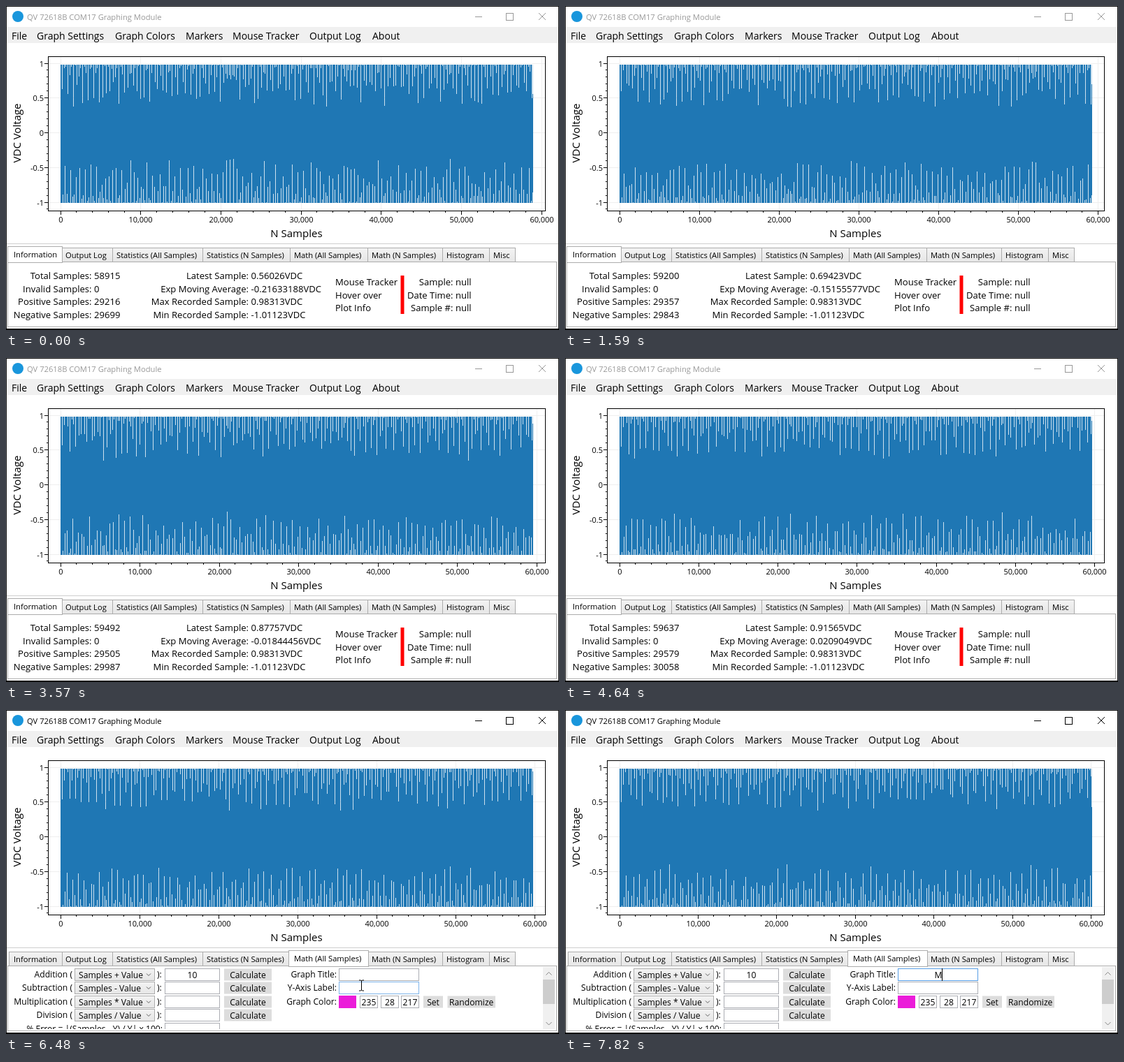
Write an HTML page that moves like this. It is 791 px wide and 464 px high and loops after 8000 ms.

```html
<!DOCTYPE html>
<html lang="en">
<head>
<meta charset="utf-8">
<title>Graphing Module</title>
<style>
  html, body { margin: 0; width: 100%; height: 100%; overflow: hidden; background: #fff; }
  svg { display: block; width: 791px; height: 464px; }
  text { font-family: "Open Sans", "Noto Sans", sans-serif; fill: #000; white-space: pre; }
  .crisp { shape-rendering: crispEdges; }
  .hidden { visibility: hidden; }
  .tab rect { fill: url(#face); stroke: #acacac; }
  .tab.hover rect { fill: url(#hot); stroke: #7eb4ea; }
  .tab.active rect { fill: #fff; }
  #title { fill: #999; }
  #buttons { stroke: #999; fill: none; }
  .focused #title { fill: #000; }
  .focused #buttons { stroke: #000; }
</style>
</head>
<body>
<svg id="stage" viewBox="0 0 791 464" xmlns="http://www.w3.org/2000/svg"></svg>
<script>
const LOOP = 8000;
const PLOT = { left: 60.5, top: 72.5, right: 771.5, bottom: 293.5, x0: 78, x1: 753.6, y0: 181.5, unit: 99.5 };
const PERIOD = 140.9, AMP = 0.997, BIAS = -0.014;

// time, samples, positive samples, latest value, moving average
const UPDATES = [
  [0, 58915, 29216, 0.56026, '-0.21633188'],
  [530, 59058, 29287, 0.63172, '-0.18402516'],
  [1590, 59200, 29357, 0.69423, '-0.15155577'],
  [2580, 59346, 29431, 0.79318, '-0.08614203'],
  [3570, 59492, 29505, 0.87757, '-0.01844456'],
  [4640, 59637, 29579, 0.91565, '0.0209049'],
  [5670, 59775, 29649, 0.94007, '0.03826596'],
  [6690, 59920, 29722, 0.71346, '0.04211835'],
  [7750, 60068, 29796, 0.43127, '0.04570912']
];
const TABS = [
  ['Information', 4, 80, 11], ['Output Log', 80, 152, 85],
  ['Statistics (All Samples)', 152, 281, 158], ['Statistics (N Samples)', 281, 406, 287],
  ['Math (All Samples)', 406, 517, 412], ['Math (N Samples)', 517, 624, 523],
  ['Histogram', 624, 691, 630], ['Misc', 691, 728, 697]
];
// time, x, y of the pointer
const POINTER = [
  [5040, 474, 441], [5320, 470, 398], [5530, 464, 368], [5670, 462, 360], [6130, 462, 360],
  [6340, 497, 384], [6480, 508, 394], [6550, 509, 390], [6620, 511, 385], [6760, 512, 380], [8000, 512, 380]
];
const CLICK_TAB = 6000, CLICK_BOX = 6760, TYPE = 7820, BLINK = 530;

const text = (x, y, s, size, anchor = 'start', more = '') =>
  `<text x="${x}" y="${y}" font-size="${size}" text-anchor="${anchor}" ${more}>${s}</text>`;
const rect = (x, y, w, h, fill, stroke = 'none', more = '') =>
  `<rect x="${x}" y="${y}" width="${w}" height="${h}" fill="${fill}" stroke="${stroke}" ${more}/>`;
const path = (d, stroke, more = '') => `<path d="${d}" stroke="${stroke}" fill="none" ${more}/>`;
const $ = id => document.getElementById(id);
const toY = v => PLOT.y0 - v * PLOT.unit;

function frameMarkup() {
  const menu = [['File', 8], ['Graph Settings', 44], ['Graph Colors', 156], ['Markers', 257],
    ['Mouse Tracker', 324], ['Output Log', 434], ['About', 524]];
  return rect(0, 0, 791, 464, '#fff') + rect(1, 30, 789, 23, '#f0f0f0') +
    '<circle cx="17" cy="15" r="8" fill="#1996dc"/>' +
    text(30, 20, 'QV 72618B COM17 Graphing Module', 11.2, 'start', 'id="title"') +
    `<g id="buttons"><path class="crisp" d="M671 15.5h10M715.5 10.5h10v10h-10z"/><path d="M762 10l10 10M772 10l-10 10"/></g>` +
    menu.map(([s, x]) => text(x, 48, s, 14, 'start', 'fill="#212121"')).join('');
}

function plotMarkup() {
  let grid = '', ticks = '', labels = '';
  for (let i = -11; i <= 10; i++) {
    const y = Math.floor(toY(i / 10)) + 0.5, major = i % 5 === 0;
    ticks += `M60 ${y}h${major ? -5 : -2}`;
    if (!major) continue;
    grid += `M61 ${y}H771`;
    labels += text(54, y + 4, i / 10, 11, 'end');
  }
  const { left, top, right, bottom } = PLOT;
  return path(grid, '#efefef', 'class="crisp"') + path('', '#efefef', 'id="xgrid" class="crisp"') +
    rect(78, 84, 676, 198, '#1f77b4', 'none', 'opacity=".22"') +
    path('', '#1f77b4', 'id="wave" class="crisp"') +
    path(ticks, '#000', 'class="crisp"') + path('', '#000', 'id="xticks" class="crisp"') +
    rect(left, top, right - left, bottom - top, 'none', '#000', 'class="crisp"') +
    labels + '<g id="xlabels"></g>' + text(415.5, 331, 'N Samples', 15, 'middle') +
    text(0, 0, 'VDC Voltage', 15, 'middle', 'transform="translate(21 182) rotate(-90)"');
}

function tabsMarkup() {
  return path('M1 340.5H790', '#cfcfcf') + rect(2.5, 366.5, 785, 93, '#fff', '#acacac') +
    TABS.map(([s, a, b, x], i) => `<g class="tab" id="tab${i}">` +
      rect(a + 0.5, 346.5, b - a, 20, '') + text(x, 361, s, 11.2) + '</g>').join('');
}

function infoMarkup() {
  const row = i => 391 + Math.round(i * 18.7);
  const pair = (s, id, x, i, value = '') =>
    text(x, row(i), s + ':', 13.07, 'end') + text(x + 3.5, row(i), value, 13.07, 'start', `id="${id}"`);
  return '<g id="info">' +
    ['Total', 'Invalid', 'Positive', 'Negative'].map((s, i) =>
      pair(s + ' Samples', s.toLowerCase(), 122.5, i, '0')).join('') +
    pair('Latest Sample', 'latest', 347, 0) + pair('Exp Moving Average', 'ema', 347, 1) +
    pair('Max Recorded Sample', 'max', 347, 2, '0.98313VDC') +
    pair('Min Recorded Sample', 'min', 347, 3, '-1.01123VDC') +
    ['Mouse Tracker', 'Hover over', 'Plot Info'].map((s, i) => text(471, row(i) + 9, s, 13.07)).join('') +
    rect(564.5, 386, 5, 55, '#f00') +
    ['Sample', 'Date Time', 'Sample #'].map((s, i) =>
      text(639.5, row(i) + 9, s + ':', 13.07, 'end') + text(643, row(i) + 9, 'null', 13.07)).join('') + '</g>';
}

function mathMarkup() {
  const size = 12.13, grey = '#abadb3';
  const rowY = i => Math.round(370 + i * 19.4) + 0.5;
  const box = (x, y, w, s = '', more = '') => rect(x + 0.5, y, w, 17, '#fff', grey, more) +
    text(x + w / 2 + 0.5, y + 13, s, size, 'middle');
  const button = (x, y, w, s) => rect(x, y, w, 17, '#ddd') + text(x + w / 2, y + 13, s, size, 'middle');
  const ops = [['Addition', '+'], ['Subtraction', '-'], ['Multiplication', '*'], ['Division', '/']];
  const left = ops.map(([s, op], i) => {
    const y = rowY(i);
    return text(95, y + 12.5, s + ' (', size, 'end') + rect(98.5, y, 114, 17, 'url(#face)', '#acacac') +
      text(104, y + 13, `Samples ${op} Value`, size) +
      path(`M201 ${y + 7}l3 3 3-3`, '#606060') + text(216, y + 12.5, '):', size) +
      box(227, y, 78, i ? '' : '10') + button(312, y, 68, 'Calculate');
  }).join('');
  const fields = ['Graph Title', 'Y-Axis Label', 'Graph Color'].map((s, i) =>
    text(473, rowY(i) + 12.5, s + ':', size, 'end')).join('');
  const y = rowY(2);
  return '<g id="math" clip-path="url(#panel)">' + left +
    text(224, rowY(4) + 12.5, '% Error = |(Samples - Y) / Y| x 100:', size, 'end') + box(227, rowY(4), 78) +
    fields + box(476, rowY(0), 114, '', 'id="nameBox"') + box(476, rowY(1), 114, '', 'id="axisBox"') +
    rect(476, 409, 25, 18, '#eb1cd9') + box(506, y, 25, 235) + box(536, y, 25, 28) + box(565, y, 25, 217) +
    button(597, y, 28, 'Set') + button(631.5, y, 68.5, 'Randomize') +
    text(534, 383.5, 'M', size, 'middle', 'id="typed"') +
    path('M0 370V388', '#000', 'id="caret" class="crisp"') +
    rect(768, 368, 17, 89, '#f0f0f0') + rect(768, 386, 17, 35, '#cdcdcd') +
    path('M772.5 379.5l4-4 4 4M772.5 447l4 4 4-4', '#858585') + '</g>';
}

$('stage').innerHTML = `<defs>
  <linearGradient id="face" x2="0" y2="1"><stop stop-color="#f3f3f3"/><stop offset="1" stop-color="#e6e6e6"/></linearGradient>
  <linearGradient id="hot" x2="0" y2="1"><stop stop-color="#ecf4fc"/><stop offset="1" stop-color="#dcecfc"/></linearGradient>
  <clipPath id="panel"><rect x="3" y="367" width="784" height="90"/></clipPath></defs>` +
  frameMarkup() + plotMarkup() + tabsMarkup() + infoMarkup() + mathMarkup() +
  path('M0 .5H791M.5 0V464M790.5 0V464', '#111', 'class="crisp"') + rect(0, 462, 791, 2, '#000') +
  `<path id="arrow" d="M0 0V16L3.7 12.5 6.2 18.2 8.6 17.1 6.2 11.6H11.3Z" fill="#fff" stroke="#000"/>` +
  path('M-3.5-7.5h2.5l1 1 1-1h2.5M0-6.5V6.5M-3.5 7.5h2.5l1-1 1 1h2.5', '#000', 'id="beam"');

const phase = i => 2 * Math.PI * i / PERIOD + 1.4 * Math.sin(i / 2300) + 0.5 * Math.sin(i / 610) + 0.7;

// highest value of sin between two phases
function peak(a, b) {
  const turn = 2 * Math.PI, crest = Math.ceil((a - Math.PI / 2) / turn) * turn + Math.PI / 2;
  return crest <= b ? 1 : Math.max(Math.sin(a), Math.sin(b));
}

function drawData([, n, positive, latest, ema]) {
  const scale = (PLOT.x1 - PLOT.x0) / n;
  let wave = '', grid = '', ticks = '', labels = '';
  for (let x = 0; x < 676; x++) {
    const a = phase(x / scale), b = phase((x + 1) / scale + 1);
    const high = x === 675 ? latest : BIAS + AMP * peak(a, b);
    const low = BIAS - AMP * peak(a + Math.PI, b + Math.PI);
    wave += `M${78.5 + x} ${Math.round(toY(high))}V${Math.round(toY(low))}`;
  }
  for (let v = -1000; v <= 61000; v += 1000) {
    if (v % 2000) continue;
    const x = Math.floor(PLOT.x0 + v * scale) + 0.5, major = v % 10000 === 0;
    if (x > PLOT.right) break;
    ticks += `M${x} 294v${major ? 5 : 2}`;
    if (!major) continue;
    grid += `M${x} 73V293`;
    labels += text(x, 310, v.toLocaleString('en-US'), 11, 'middle');
  }
  $('wave').setAttribute('d', wave);
  $('xgrid').setAttribute('d', grid);
  $('xticks').setAttribute('d', ticks);
  $('xlabels').innerHTML = labels;
  $('total').textContent = n;
  $('positive').textContent = positive;
  $('negative').textContent = n - positive;
  $('latest').textContent = latest.toFixed(5) + 'VDC';
  $('ema').textContent = ema + 'VDC';
}

function pointerAt(t) {
  const start = t < 6130 ? 5040 : 6130;
  const s = start + Math.floor((t - start) / 70) * 70;
  const k = Math.max(1, POINTER.findIndex(p => p[0] > s));
  const [t0, x0, y0] = POINTER[k - 1], [t1, x1, y1] = POINTER[k];
  const f = (s - t0) / (t1 - t0);
  return [x0 + (x1 - x0) * f, y0 + (y1 - y0) * f];
}

const show = (id, on) => $(id).classList.toggle('hidden', !on);

function setTab(active, hover) {
  TABS.forEach(([, a, b, x], i) => {
    const tab = $('tab' + i), on = i === active, r = tab.firstChild;
    tab.setAttribute('class', 'tab' + (on ? ' active' : i === hover ? ' hover' : ''));
    r.setAttribute('x', (on ? a - 2 : a) + 0.5);
    r.setAttribute('y', on ? 344.5 : 346.5);
    r.setAttribute('width', on ? b - a + 4 - (i ? 1 : 2) : b - a);
    r.setAttribute('height', on ? 23 : 20);
    tab.lastChild.setAttribute('y', on ? 360 : 361);
  });
  // the active tab covers its neighbours
  $('info').before($('tab' + active));
}

let shownData, shownTab;

function render(t) {
  const data = UPDATES.filter(u => u[0] <= t).pop();
  if (data !== shownData) drawData(shownData = data);

  const clicked = t >= CLICK_TAB, visible = t >= 5040 && t < TYPE;
  const [x, y] = pointerAt(Math.max(t, 5040));
  const overTab = visible && !clicked && y < 366;
  const tabKey = clicked + '/' + overTab;
  if (tabKey !== shownTab) {
    shownTab = tabKey;
    setTab(clicked ? 4 : 0, overTab ? 4 : -1);
  }
  $('stage').classList.toggle('focused', clicked);
  show('info', !clicked);
  show('math', clicked);

  const inBox = clicked && x > 476 && y > 370 && y < 407;
  show('arrow', visible && !inBox);
  show('beam', visible && inBox);
  $(inBox ? 'beam' : 'arrow').setAttribute('transform', `translate(${Math.round(x) + (inBox ? 0.5 : -0.5)} ${Math.round(y) + 0.5})`);

  const focus = t >= CLICK_BOX, typed = t >= TYPE;
  const overName = inBox && y < 389;
  $('nameBox').setAttribute('stroke', focus ? '#569de5' : overName ? '#7eb4ea' : '#abadb3');
  $('axisBox').setAttribute('stroke', inBox && !overName ? '#7eb4ea' : '#abadb3');
  show('typed', typed && clicked);
  show('caret', focus && (typed || t < CLICK_BOX + BLINK));
  $('caret').setAttribute('transform', `translate(${typed ? 539.5 : 533.5} 0)`);
}

function tick() {
  render(performance.now() % LOOP);
  requestAnimationFrame(tick);
}
tick();
</script>
</body>
</html>
```
